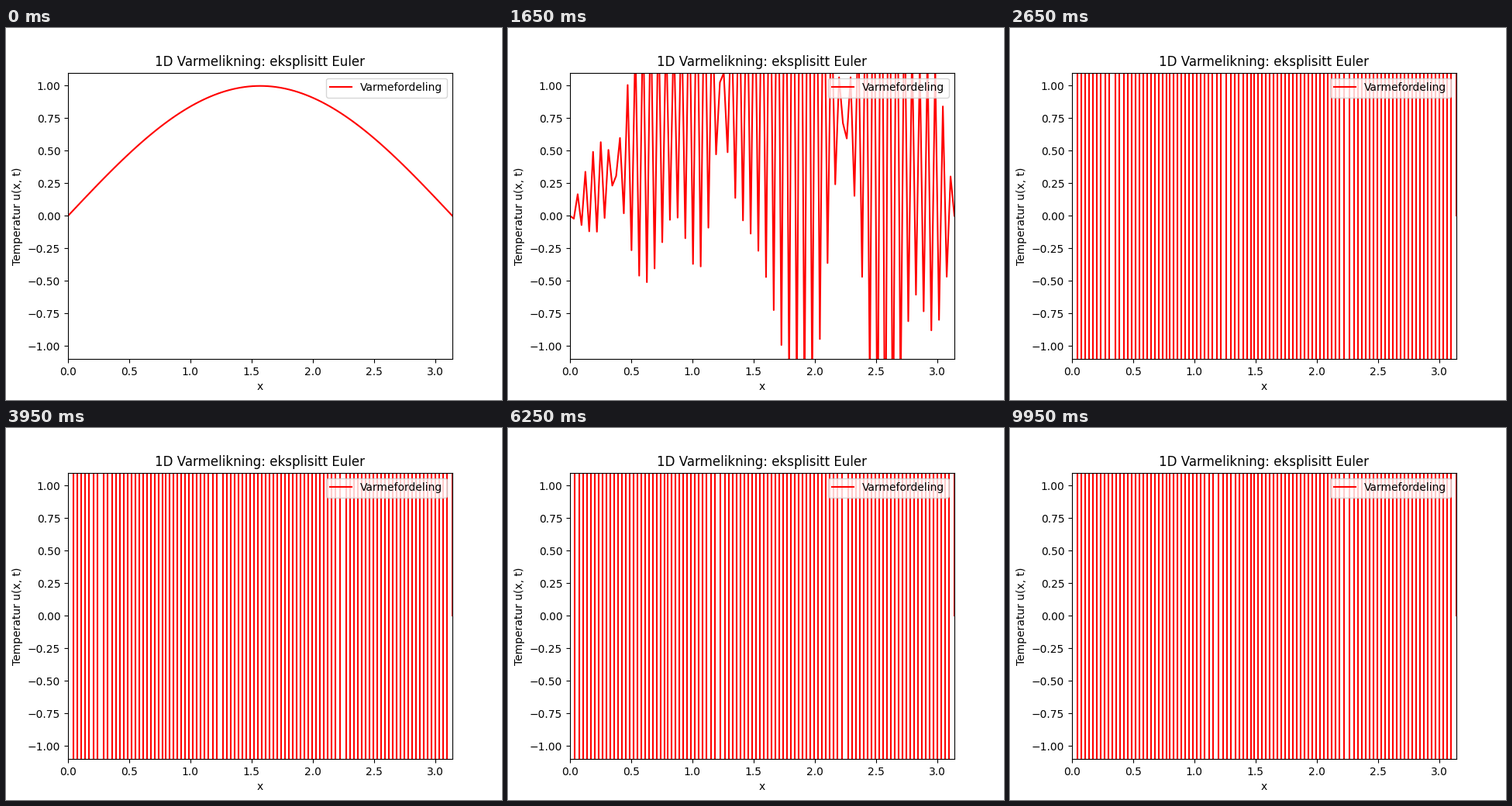
A matplotlib script that plays this animation: 640 px wide and 480 px high, repeating every 10000 ms.

```python
import matplotlib.pyplot as plt
import numpy as np
from matplotlib.animation import FuncAnimation

FRAMES = 200
INTERVAL = 50
CELLS = 100
DT = 0.001

x = np.linspace(0, np.pi, CELLS + 1)
dx = x[1] - x[0]
r = DT / dx**2


def euler_step(u):
    """One explicit Euler step with fixed zero ends."""
    new = u.copy()
    new[1:-1] = u[1:-1] + r * (u[2:] - 2 * u[1:-1] + u[:-2])
    new[0] = new[-1] = 0
    return new


def solve(steps):
    states = [np.sin(x)]
    for _ in range(steps):
        states.append(euler_step(states[-1]))
    return states


states = solve(FRAMES + 1)

fig, ax = plt.subplots(figsize=(6.4, 4.8), dpi=100)
line, = ax.plot(x, states[0], color="red", label="Varmefordeling")
ax.set_xlim(0, np.pi)
ax.set_ylim(-1.1, 1.1)
ax.set_xlabel("x")
ax.set_ylabel("Temperatur u(x, t)")
ax.set_title("1D Varmelikning: eksplisitt Euler")
ax.legend(loc="upper right")


def update(frame):
    line.set_ydata(states[frame + 2])
    return line,


anim = FuncAnimation(fig, update, frames=FRAMES, interval=INTERVAL, repeat=True)
plt.show()
```
